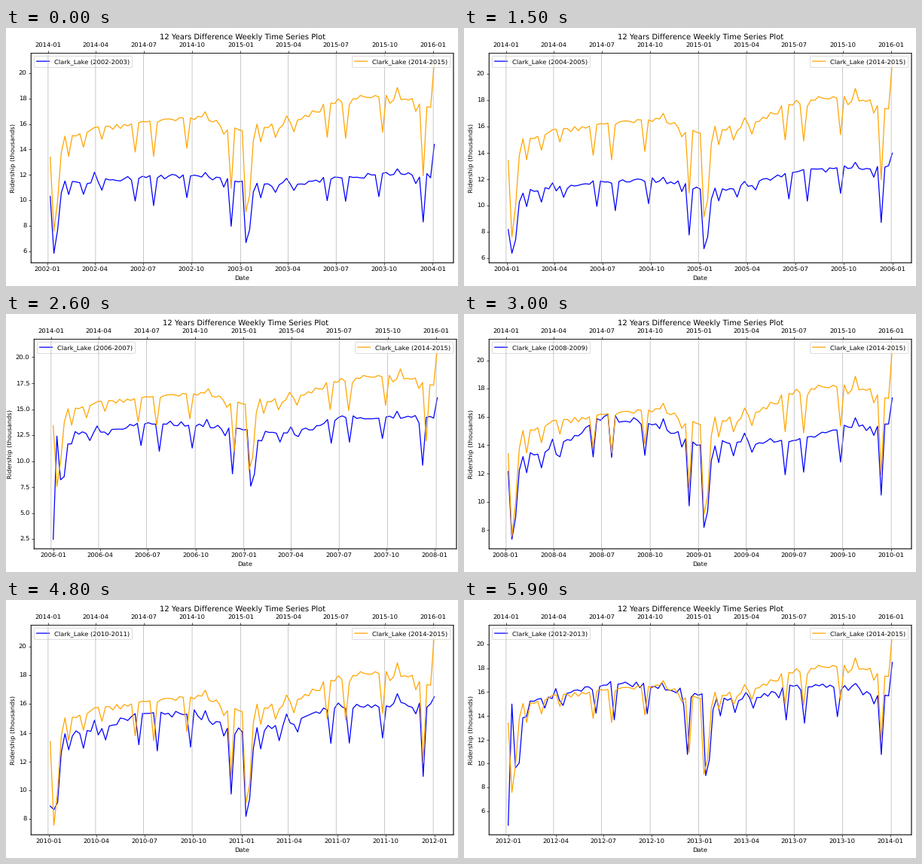
Write a matplotlib script that moves like this. It is 600 px wide and 343 px high and loops after 6 s.

```python
import matplotlib.dates as mdates
import matplotlib.pyplot as plt
import numpy as np
from matplotlib.animation import FuncAnimation

W, H, DPI = 600, 343, 60.3
FRAMES, INTERVAL = 60, 100
LEFT, TOP = 33.2, 33.5  # axes corner in pixels
AX_W, AX_H = 9.3 * DPI, 4.62 * DPI
YEARS = [2002, 2004, 2006, 2008, 2010, 2012]
BASE = 2014

# Opening week, January low, closing week, then the level every quarter
TRENDS = {
    2002: (10.3, 5.83, 14.4, [11.4, 11.4, 11.8, 12, 11.4, 11.2, 11.8, 12.1, 12]),
    2004: (8.15, 6.35, 13.95,
           [10.9, 11.15, 11.8, 12, 11.3, 11.4, 12.6, 12.8, 12.9]),
    2006: (2.48, 8.2, 16.1,
           [12.5, 12.8, 13.6, 13.4, 13, 12.6, 14.2, 14.1, 14.2]),
    2008: (12.15, 7.36, 17.35,
           [13, 13.7, 16.1, 15.5, 14, 14.2, 14.4, 15.3, 15.4]),
    2010: (8.9, 8.65, 16.5,
           [13.5, 14.1, 15.5, 15.3, 14, 14.6, 15.9, 15.9, 16]),
    2012: (4.82, 9.65, 18.5,
           [14.9, 15.6, 16.7, 16.5, 15.6, 15.3, 16.5, 16.4, 15.5]),
    2014: (13.4, 7.57, 20.82,
           [14.7, 15.4, 16.3, 16.4, 15.6, 16, 17.9, 18.1, 17.5]),
}

# Ratio to the usual level in the week ending on the first Sunday from a date
SEASON = {
    "01-09": 0.58, "01-16": 0.67, "01-23": 0.93, "02-04": 0.91, "03-07": 0.93,
    "03-26": 1.05, "04-12": 0.95, "06-14": 0.85, "07-19": 0.82, "09-21": 0.85,
    "10-21": 1.04, "11-26": 0.95, "12-09": 0.68,
}

plt.rcParams.update({"text.hinting": "no_hinting", "path.snap": False})


def sunday(day):
    """First Sunday on or after a date."""
    return np.busday_offset(day, 0, roll="forward", weekmask="Sun")


def weekly_rides(year):
    """Sundays of two years and the mean ridership of each week."""
    opening, low, closing, levels = TRENDS[year]
    dates = np.arange(sunday(f"{year}-01-01"), sunday(f"{year + 1}-12-31") + 1, 7)
    weeks = len(dates)
    knots = np.linspace(0, weeks - 1, len(levels))
    rides = np.interp(np.arange(weeks), knots, levels)
    rides *= 1 + np.random.default_rng(year).normal(0, 0.01, weeks)
    for y in (year, year + 1):
        for day, ratio in SEASON.items():
            rides[dates == sunday(f"{y}-{day}")] *= ratio
    rides[dates == sunday(f"{year}-01-09")] = low
    rides[0], rides[-1] = opening, closing
    return dates, rides


def plot_years(ax, year, color, loc):
    """Draw one series with quarterly ticks and a legend."""
    ax.plot(*weekly_rides(year), color=color,
            label=f"Clark_Lake ({year}-{year + 1})")
    ax.xaxis.set_major_locator(mdates.MonthLocator((1, 4, 7, 10)))
    ax.xaxis.set_major_formatter(mdates.DateFormatter("%Y-%m"))
    ax.legend(loc=loc)


def make_chart(year):
    # Wider tick labels push the axes to the right
    left = LEFT + (4 if year == 2006 else 0)
    ax = fig.add_axes([left / W, 1 - (TOP + AX_H) / H, AX_W / W, AX_H / H],
                      label=str(year))
    ax.set_xlabel("Date")
    ax.set_ylabel("Ridership (thousands)")
    plot_years(ax, year, "blue", "upper left")
    top = ax.twiny()
    plot_years(top, BASE, "orange", "upper right")
    top.grid(True)
    top.set_title("12 Years Difference Weekly Time Series Plot")
    return ax, top


def draw(frame):
    shown = min((frame + 1) // 10, len(charts) - 1)
    for i, chart in enumerate(charts):
        for ax in chart:
            ax.set_visible(i == shown)
    return []


# The tiny excess keeps the pixel size from rounding down
fig = plt.figure(figsize=((W + 1e-3) / DPI, (H + 1e-3) / DPI), dpi=DPI,
                 facecolor="white")
charts = [make_chart(year) for year in YEARS]
draw(0)
anim = FuncAnimation(fig, draw, frames=FRAMES, interval=INTERVAL, repeat=True,
                     repeat_delay=0, blit=False)
plt.show()
```
